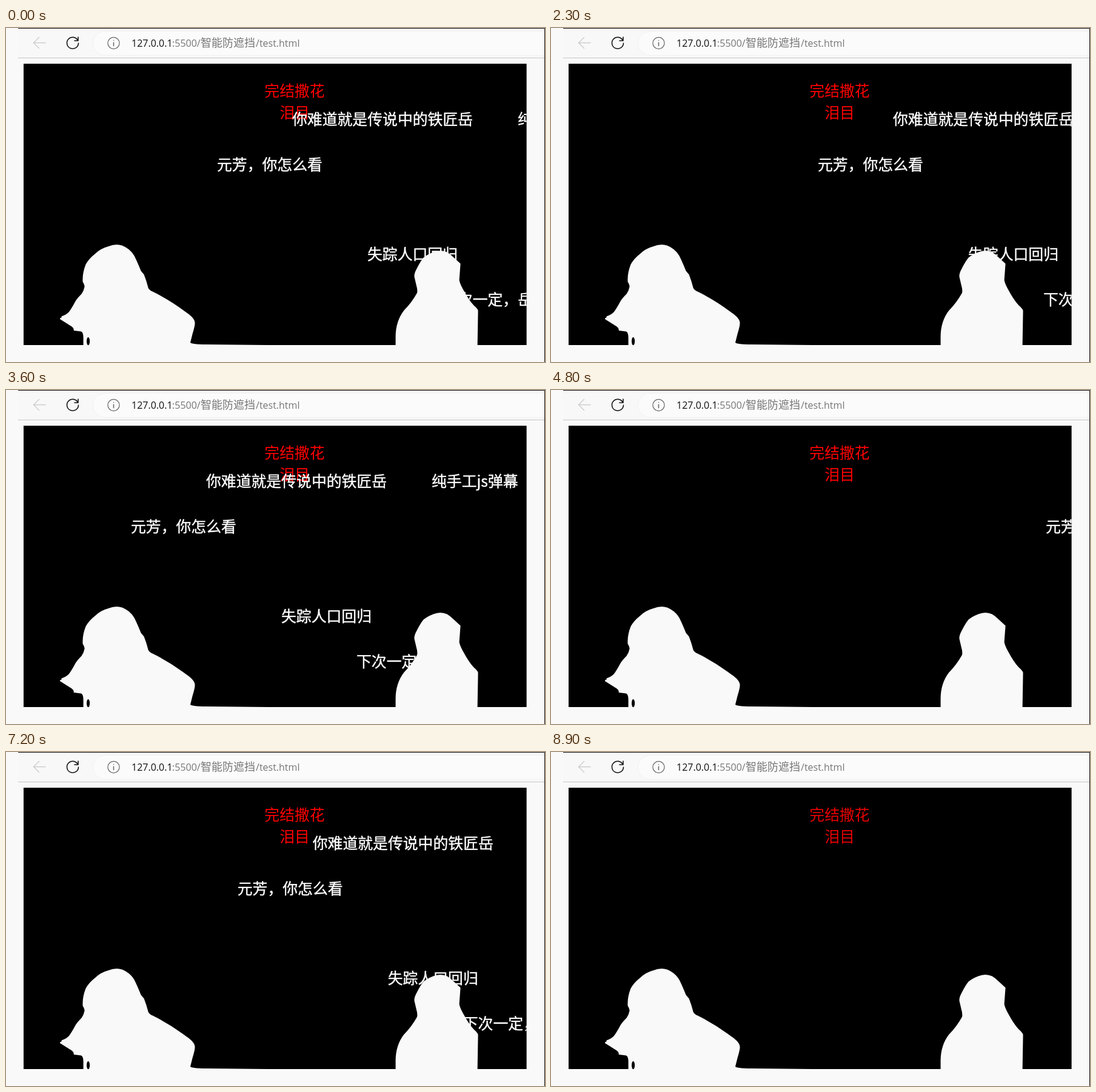
An HTML page for the animation above (9000 ms loop, 889 px wide and 552 px high).

```html
<!DOCTYPE html>
<html lang="zh-CN">
<head>
<meta charset="utf-8">
<title>弹幕防遮挡</title>
<style>
  html, body { margin: 0; width: 100%; height: 100%; overflow: hidden; background: #f9f9f9; }
  svg { display: block; }
  .comment { font: 24.85px "Noto Sans CJK SC", "Noto Sans CJK", sans-serif; }
  .url { font: 16px "Open Sans", "Noto Sans CJK SC", sans-serif; fill: #767676; }
  .icon { fill: none; stroke-linecap: round; stroke-linejoin: round; }
</style>
</head>
<body>
<svg width="889" height="552" viewBox="0 0 889 552">
  <defs>
    <clipPath id="screen"><rect x="29" y="59" width="829.6" height="465"/></clipPath>
  </defs>

  <!-- Browser bar -->
  <rect x="20" width="869" height="49" fill="#f8f8f8"/>
  <rect x="143.5" y="5.5" width="800" height="39.5" rx="19.75" fill="#fbfbfb" stroke="#f2f2f2"/>
  <path d="M20 49.5H889" stroke="#c6c6c6"/>
  <path d="M20 .5H888.5V552" fill="none" stroke="#111"/>
  <path class="icon" d="M65 24.500H45.500M54.500 15.500L45.500 24.500L54.500 33.500" stroke="#cdcdcd" stroke-width="1.4"/>
  <path class="icon" d="M118.5 20.5A9.5 9.5 0 1 0 119.5 25M119 15V21H113" stroke="#151515" stroke-width="1.6"/>
  <g class="icon" stroke="#666" stroke-width="1.2">
    <circle cx="177.5" cy="25" r="9.6"/>
    <path d="M177.5 24V29.5M177.5 20.4V20.6" stroke-width="1.5"/>
  </g>
  <text class="url" y="31">
    <tspan x="207" fill="#111">127.0.0.1</tspan><tspan x="274">:5500/</tspan><tspan x="321" font-size="18">智能防遮挡</tspan><tspan x="412">/test.html</tspan>
  </text>

  <!-- Video with comments, covered by the silhouettes -->
  <rect x="29" y="59" width="829.6" height="465"/>
  <g id="pinned" class="comment" fill="#f00" text-anchor="middle">
    <text x="476" y="113">完结撒花</text>
    <text x="476" y="149">泪目</text>
  </g>
  <g clip-path="url(#screen)">
    <g id="scroll" class="comment" fill="#fff" stroke="#fff" stroke-width=".4"></g>
  </g>
  <g transform="translate(.6 .6)">
    <g fill="#f9f9f9">
      <path d="M127 525V512Q127 502 123 501L111 499.500Q112 496 108 493L89 481Q87 479 91 478V476
        Q98 474 103 469Q107 464 114 451Q117 446 124 439Q128 433 129 427Q129 424 126 419Q125 405 131 390
        Q136 381 146 373Q155 364 168 360.500Q181 355 191 359Q204 364 211 376Q216 386 222 401L227 407
        Q231 417 234 429Q236 433 241 435Q270 449 296 469Q311 479 311 487Q311 492 307 505L303.500 519
        Q303 522 330 522.500L430 523.500V525Z"/>
      <path d="M642 525V510Q642 484 656 466Q668 454 677 438Q679 434 676 424L673 411Q672 406 677 397
        Q683 385 688 379Q694 374 704 370Q716 365 727 370Q732 373 737 378L749 389L747 416Q748 422 753 431
        Q762 448 771 458Q778 464 778 467L777 525Z"/>
    </g>
    <ellipse cx="135" cy="517" rx="2.6" ry="6.6"/>
  </g>
</svg>
<script>
const LOOP = 9000, STEP = 100, OFF = 900, SPACING = 124;
const comments = [
  ["元芳，你怎么看", 234.6],
  ["你难道就是传说中的铁匠岳", 160.2],
  ["失踪人口回归", 383.4],
  ["下次一定，岳哥", 457.8],
  ["纯手工js弹幕", 160.2],
];
// [step, left edge of the first comment]
const track = [
  [0, 348], [1, 835], [20, 492], [23, 440], [30, 313], [36, 206], [38, 170],
  [39, OFF], [45, OFF], [46, 852], [48, 816], [55, 689], [64, 526], [65, 507],
  [75, 328], [80, 233.5], [84, 165], [85, OFF], [89, OFF],
];
const restarts = [39, 85];

const scroll = document.getElementById("scroll");
const pinned = document.getElementById("pinned");

comments.forEach(([words, y], i) => {
  const text = document.createElementNS(scroll.namespaceURI, "text");
  text.setAttribute("x", i * SPACING);
  text.setAttribute("y", y);
  text.textContent = words;
  scroll.append(text);
});

function positionAt(step) {
  const i = Math.max(1, track.findIndex(([s]) => s >= step));
  const [s0, x0] = track[i - 1], [s1, x1] = track[i];
  return x0 + (x1 - x0) * (step - s0) / (s1 - s0);
}

function opacityAt(step) {
  const start = restarts.findLast(s => s <= step);
  return start === undefined ? 1 : Math.min(1, 0.1 + 0.2 * (step - start));
}

function draw() {
  const step = Math.floor(performance.now() % LOOP / STEP);
  scroll.setAttribute("transform", `translate(${positionAt(step)} 0)`);
  pinned.setAttribute("opacity", opacityAt(step));
  requestAnimationFrame(draw);
}
draw();
</script>
</body>
</html>
```
